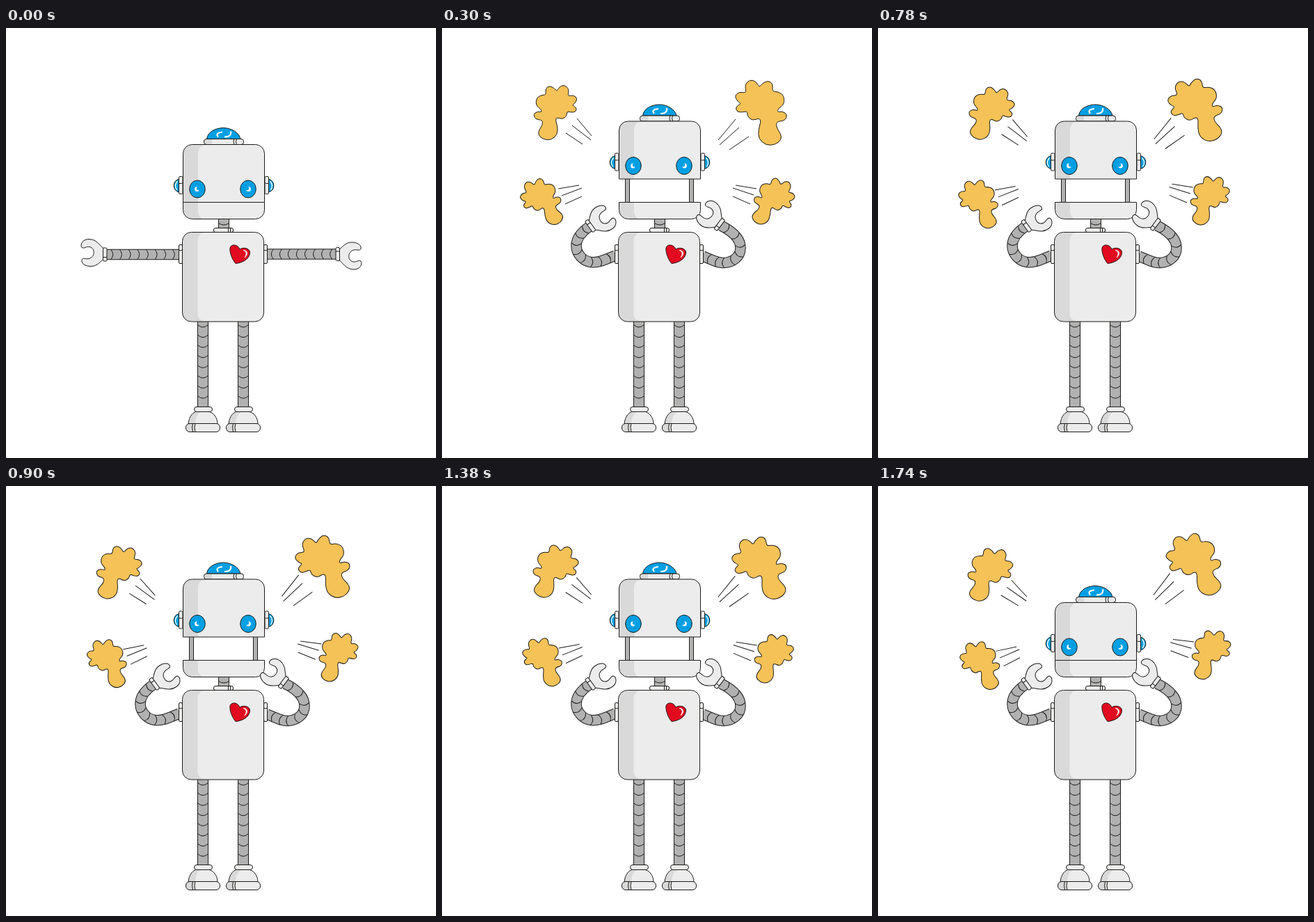
Recreate the animation shown at these times as an HTML page with a canvas. Size 618x618 px, loop 1.8 s.

```html
<!DOCTYPE html>
<html>
<head>
<meta charset="utf-8">
<style>
html, body { margin: 0; width: 100%; height: 100%; overflow: hidden; background: #fff; }
canvas { display: block; }
</style>
</head>
<body>
<canvas id="stage" width="618" height="618"></canvas>
<script>
const c = document.getElementById('stage').getContext('2d');
const INK = '#1d1d1b', LIGHT = '#ececec', SHADE = '#d9d9d9', STEEL = '#b1b1b1',
      BLUE = '#009fe3', RED = '#e20a1e', GOLD = '#f4c256';
const STEP = 60, FRAMES = 30, MOUTH = 33.5;

const lerp = (a, b, k) => a + (b - a) * k;
const ease = k => { k = Math.min(1, Math.max(0, k)); return (1 - Math.cos(Math.PI * k)) / 2; };

function shape(path, fill, stroke = INK, width = 1) {
  if (typeof path === 'string') path = new Path2D(path);
  if (fill) { c.fillStyle = fill; c.fill(path); }
  if (stroke) { c.strokeStyle = stroke; c.lineWidth = width; c.stroke(path); }
}
function box(x1, y1, x2, y2, r) {
  const p = new Path2D();
  p.roundRect(x1, y1, x2 - x1, y2 - y1, r);
  return p;
}
function oval(x, y, rx, ry, from = 0, to = 2 * Math.PI) {
  const p = new Path2D();
  p.ellipse(x, y, rx, ry, 0, from, to);
  return p;
}
function moved(x, y, angle, draw) {
  c.save();
  c.translate(x, y);
  c.rotate(angle);
  draw();
  c.restore();
}
// Panel with a darker strip on its left side
function panel(path, lit) {
  shape(path, SHADE, null);
  c.save();
  c.clip(path);
  shape(lit, LIGHT, null);
  c.restore();
  shape(path);
}

// Puffs: outline through a few points, smoothed
const outline = [
  150,97, 149,88, 155,84, 162,88, 165,92, 169,85, 176,83, 182,89, 180,99,
  188,97, 194,102, 190,109, 186,111, 193,115, 191,121, 184,121, 179,120,
  179,126, 173,131, 165,128, 163,132, 166,141, 166,152, 157,160, 146,159,
  139,153, 140,146, 145,139, 145,132, 135,131, 132,124, 138,120, 144,121,
  143,117, 136,112, 136,102, 143,97
];
const puff = (() => {
  const p = new Path2D(), n = outline.length / 2;
  const at = i => [outline[2 * (i % n)] - 163, outline[2 * (i % n) + 1] - 121.5];
  const mid = i => { const a = at(i), b = at(i + 1); return [(a[0] + b[0]) / 2, (a[1] + b[1]) / 2]; };
  p.moveTo(...mid(0));
  for (let i = 1; i <= n; i++) p.quadraticCurveTo(...at(i), ...mid(i));
  p.closePath();
  return p;
})();
const puffs = [
  { x: 163, y: 121.5, sx: 1.03, sy: 1.03, side: 1, tilt: 0 },
  { x: 458.5, y: 121.5, sx: 1.23, sy: 1.23, side: -1, tilt: 0 },
  { x: 144, y: 251.5, sx: .9, sy: .94, side: -1, tilt: 20 },
  { x: 475.5, y: 251, sx: .9, sy: .94, side: 1, tilt: 20 }
];
const dashes = 'M194 130L215 155M187 140L214 161M178 151L202 167' +
  'M397 161L422 131M399 168L427 143M413 175L441 156' +
  'M167 231L197 226M172 241L201 230M177 253L201 242' +
  'M452 231L422 226M448 240L418 230M443 253L418 242';

function drawPuffs(n) {
  if (n < 3) return;
  const swing = n < 9 ? ease((n - 5) / 3.6)
                      : .685 + .385 * Math.cos(2 * Math.PI * (n - 8) / 10);
  const early = n < 8 || n % 10 === 6 || n % 10 === 7;
  moved(305, 181, -.0468 * swing, () => {
    c.translate(-305, -181);
    shape(dashes, null);
    for (const p of puffs) {
      // The left pair turns clockwise, the right pair the other way
      const turn = early ? 0 : (p.x < 300 ? 12 : -12);
      moved(p.x, p.y, (p.side * p.tilt + turn) * Math.PI / 180, () => {
        c.scale(p.side * p.sx, p.sy);
        shape(puff, GOLD, INK, 1 / p.sx);
      });
    }
  });
}

function legs() {
  for (const dx of [0, 58]) {
    moved(dx, 0, 0, () => {
      shape(box(275.5, 420, 290.5, 546, 0), STEEL);
      for (let i = 0; i < 8; i++) {
        const y = 426.5 + 14.6 * i;
        shape(`M275.5 ${y}Q283 ${y + 7} 290.5 ${y}`, null);
      }
      const shoe = new Path2D('M262 569C263 558 269 551 276 551H290C298 552 304 560 304 569Z');
      panel(shoe, new Path2D('M272 569C272 559 276 553 283 551H306V570Z'));
      panel(box(258.5, 568.5, 307.5, 580.5, 5.5), box(271, 567, 312, 582, 0));
      shape('M268.5 568.5Q266.5 574 268.5 580.5M272 568.5Q270 574 272 580.5', null);
      shape(box(270.5, 544.5, 296.5, 551.5, 3.5), LIGHT);
    });
  }
}

function neck() {
  shape(box(305.5, 270, 320.5, 290, 0), STEEL);
  shape('M305.5 280.5Q313 285.5 320.5 280.5', null);
  shape(box(298.5, 287.5, 326.5, 293.5, 2.5), LIGHT);
  shape('M319.5 287.5V293M322.5 287.5V293', null);
}

function head(open) {
  const lift = -MOUTH * open;
  if (open > .02)
    for (const x of [263.5, 355.5]) shape(box(x, 245 + lift, x + 6, 252, 0), STEEL);
  panel(box(254.5, 250.5, 371.5, 274.5, [0, 0, 13, 13]), box(276, 240, 390, 275, [0, 0, 0, 11]));
  moved(0, lift, 0, () => {
    // Ears, mirrored about the middle of the head
    for (const side of [1, -1]) {
      c.save();
      c.translate(313, 0);
      c.scale(side, 1);
      shape(oval(-64, 226.5, 7.8, 9.2, Math.PI / 2, Math.PI * 1.5), BLUE);
      shape('M-66.5 220Q-72 226 -67.5 233', null, '#fff', 1.3);
      shape(box(-64.5, 219.5, -59, 238.5, 1.5), LIGHT);
      shape(box(-64.5, 213.5, -59, 223.5, 1.5), LIGHT);
      c.restore();
    }
    shape('M288.5 159.5C290 148 303 143.5 313 143.5C324 144 335 150 337 159.5Z', BLUE);
    shape('M305 156.5Q300 151 311 149.5M323 148.5Q324.5 156.5 314 156.5', null, '#fff', 2.2);
    panel(box(284.5, 159.5, 341.5, 167.5, 3.5), box(296, 158, 345, 170, 0));
    shape('M328 159.5Q326 163 328 167.5M331.5 159.5Q329.5 163 331.5 167.5', null);
    panel(box(254.5, 167.5, 371.5, 250.5, [13, 13, 0, 0]), box(276, 168, 390, 252, [11, 0, 0, 0]));
    for (const [x, d] of [[275, 1], [348, -1]]) {
      shape(oval(x, 231.5, 11.3, 12.5), BLUE);
      const g = x - d * .8;
      shape(oval(g + d * .3, 231.5, 3.3, 3.5), '#fff', null);
      shape(oval(g + d * 2.3, 230.2, 2.7, 2.8), BLUE, null);
    }
  });
}

// Arms: three joined cubics, straight at rest and curled when raised
const arms = [
  { from: 249, to: 145, y: 325.5, a0: 180, a1: 324,
    curl: [249,327, 236,332, 226,338, 214,336.5, 203,335, 193,325, 193,313, 193,301, 201,293, 211,286] },
  { from: 375, to: 474, y: 325, a0: 0, a1: -143,
    curl: [375,328, 388,333, 396,338, 405,337.5, 418,337, 429,329, 429,316, 429,302, 415,291, 401,284] }
];
const wrench = 'M5 -7C9 -9 13 -17 23 -17C31 -17 37 -13 36 -8C35 -4 30 -7 26 -6C17 -4 16 9 25 11' +
  'C30 12 32 8 36 10C39 14 35 22 26 22C14 22 10 12 5 9Z';

function bend(p, u) {
  const s = Math.min(2, Math.floor(u)), t = u - s, m = 1 - t;
  const q = p.slice(3 * s, 3 * s + 4);
  return [0, 1].map(k =>
    m * m * m * q[0][k] + 3 * m * m * t * q[1][k] + 3 * m * t * t * q[2][k] + t * t * t * q[3][k]);
}
function arm(a, raised) {
  const p = [];
  for (let i = 0; i < 10; i++)
    p.push([lerp(lerp(a.from, a.to, i / 9), a.curl[2 * i], raised), lerp(a.y, a.curl[2 * i + 1], raised)]);
  const tube = new Path2D();
  tube.moveTo(...p[0]);
  for (let i = 1; i < 10; i += 3) tube.bezierCurveTo(...p[i], ...p[i + 1], ...p[i + 2]);
  shape(tube, null, INK, 15.5);
  shape(tube, null, STEEL, 13.5);
  for (let i = 0; i < 8; i++) {
    const u = .22 + i * .365, [x, y] = bend(p, u), [x2, y2] = bend(p, u + .01);
    moved(x, y, Math.atan2(y2 - y, x2 - x), () => shape('M2 -7Q-4 0 2 7', null));
  }
  moved(...p[9], lerp(a.a0, a.a1, raised) * Math.PI / 180, () => {
    shape(wrench, LIGHT);
    shape(box(0, -9.5, 5.5, 9.5, 1.5), LIGHT);
    shape('M0 -4H5.5', null);
  });
}

function torso() {
  for (const x of [248.5, 370.5]) {
    shape(box(x, 311.5, x + 5, 338.5, 1.5), LIGHT);
    shape(`M${x} 319Q${x + 2.5} 321 ${x + 5} 319`, null);
  }
  panel(box(253.5, 293.5, 370.5, 422, 13), box(275.5, 294, 390, 421.5, 11));
  shape('M330 338.5C325 333 321 322 322 316C323 310.5 333 310 336 318' +
    'C341 314.5 350 316.5 350.5 322C351 329 344 337 330 338.5Z', RED);
  shape('M341 319.5C347 319 349 325 343 330C346 325 346 321 341 319.5Z', '#fff', '#fff', .7);
}

function draw(now) {
  const n = Math.floor(now / STEP) % FRAMES;
  const raised = ease(n / 4);
  c.fillStyle = '#fff';
  c.fillRect(0, 0, 618, 618);
  drawPuffs(n);
  legs();
  neck();
  head(raised * (1 - ease((n - 25) / 4)));
  for (const a of arms) arm(a, raised);
  torso();
}

const start = performance.now();
(function tick() {
  draw(performance.now() - start);
  requestAnimationFrame(tick);
})();
</script>
</body>
</html>
```
